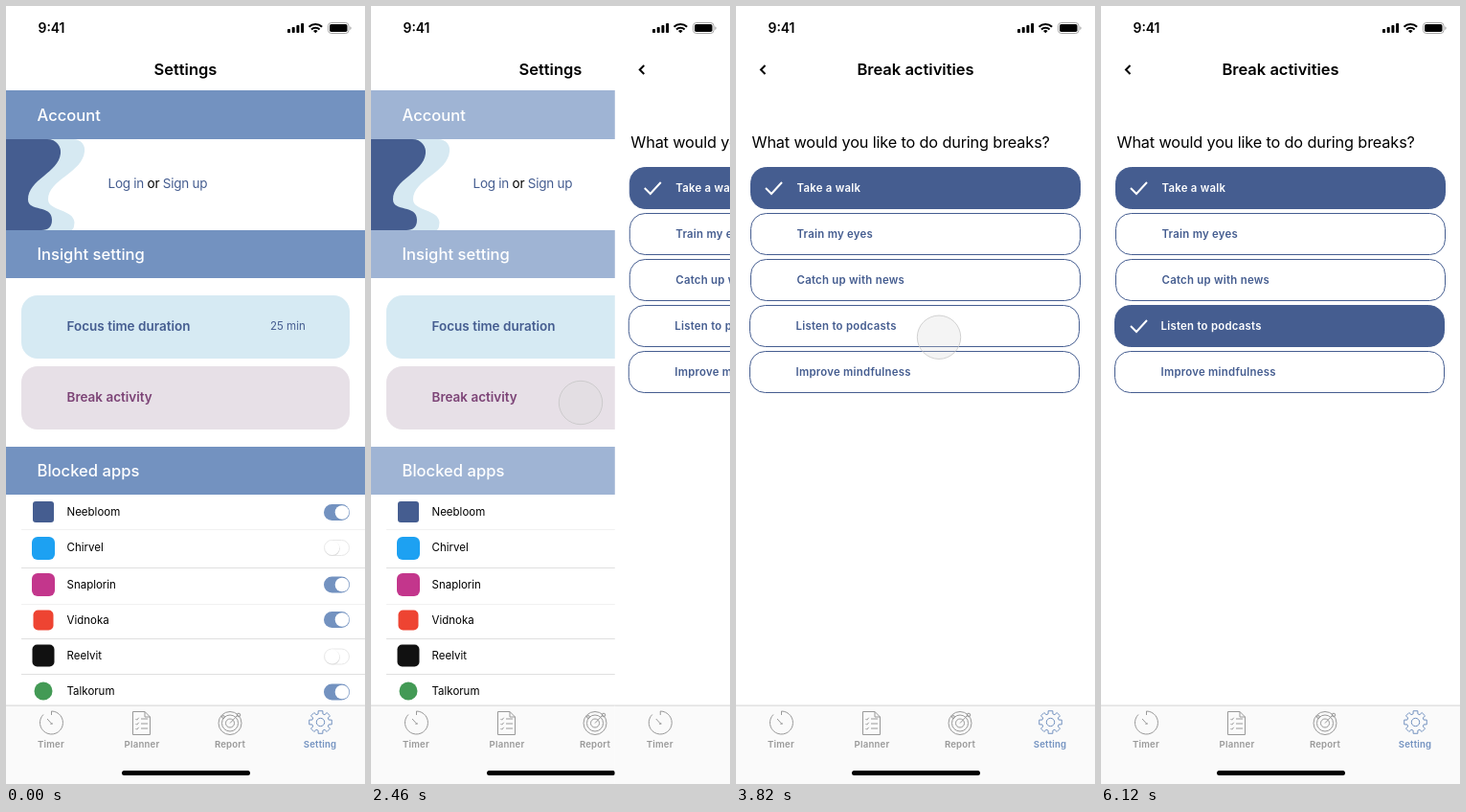
These frames come from a looping animation (375x812 px, 7.82 s). An HTML page:

```html
<!DOCTYPE html>
<html lang="en">
<head>
<meta charset="utf-8">
<title>Break settings</title>
<style>
  html, body { margin: 0; width: 100%; height: 100%; overflow: hidden; background: #fff; }
  svg { display: block; width: 100%; height: 100%; }
  text { font-family: Inter, "Liberation Sans", sans-serif; font-size: 11.5px; }
  .title { font-size: 16.5px; font-weight: 600; text-anchor: middle; }
  .head { font-size: 16.6px; font-weight: 500; fill: #fff; }
  .card { font-size: 13.5px; font-weight: 600; }
  .login { font-size: 13.5px; letter-spacing: -.25px; }
  .ask { font-size: 16.3px; letter-spacing: -.15px; }
  .option { font-size: 11.4px; font-weight: 600; letter-spacing: .25px; }
  .tab { font-size: 9.6px; font-weight: 600; letter-spacing: .2px; text-anchor: middle; }
  .line { fill: none; stroke: #999; stroke-width: 1; }
  .check { fill: none; stroke: #fff; stroke-width: 2; }
</style>
</head>
<body>
<svg id="stage" viewBox="0 0 375 812"></svg>
<script>
const LOOP = 7820, NAVY = '#455d90', BLUE = '#7392c0';

const rect = (x, y, w, h, r, fill, more = '') =>
  `<rect x="${x}" y="${y}" width="${w}" height="${h}" rx="${r}" fill="${fill}" ${more}/>`;
const circle = (x, y, r, more = '') => `<circle cx="${x}" cy="${y}" r="${r}" ${more}/>`;
const path = (d, more = '') => `<path d="${d}" ${more}/>`;
const text = (x, y, s, cls = '', fill = '#000', more = '') =>
  `<text x="${x}" y="${y}" class="${cls}" fill="${fill}" ${more}>${s}</text>`;

function gear(cx, cy) {
  const pts = [];
  for (let i = 0; i < 8; i++)
    for (const [off, r] of [[-.27, 9], [-.2, 12], [.2, 12], [.27, 9]]) {
      const a = i * Math.PI / 4 + off;
      pts.push((cx + r * Math.sin(a)).toFixed(2) + ' ' + (cy - r * Math.cos(a)).toFixed(2));
    }
  const style = `fill="none" stroke="${BLUE}" stroke-linejoin="round"`;
  return path('M' + pts.join('L') + 'Z', style) + circle(cx, cy, 4.2, style);
}

function tabBar() {
  const names = [['Timer', 47], ['Planner', 142], ['Report', 234], ['Setting', 328]];
  const ticks = [744, 749, 754].map(y => `M135.5 ${y}l1.2 1.2 2-2.4M141 ${y}h7`).join('');
  return rect(0, 730, 375, 82, 0, '#fafafa') + rect(0, 729.5, 375, 1.2, 0, '#dcdcdc') +
    path('M47.5 740v-4A12 12 0 1 1 39 739.5M48.5 750l-5.5-6M46.5 750l2-2', 'class="line"') +
    path('M132.5 736.5h12.5l5.5 5.5v18.5h-18zM145 736.5v5.5h5.5' + ticks, 'class="line"') +
    [12, 8.5, 4.5].map(r => circle(234, 748.5, r, 'class="line"')).join('') +
    path('M234 748.5l8-8.5', 'class="line"') +
    circle(243, 740, 1.8, 'class="line"') + circle(227, 742, 1.4, 'class="line"') +
    gear(328.5, 747.5) +
    names.map(([s, x], i) => text(x, 774, s, 'tab', i < 3 ? '#999' : BLUE)).join('') +
    rect(121, 798, 134, 5, 2.5, '#000');
}

function toggle(y, on) {
  return on
    ? rect(332, y - 8.5, 27, 17, 8.5, BLUE) + circle(351, y, 7.3, 'fill="#fff"')
    : rect(332.5, y - 8, 26, 16, 8, '#fff', 'stroke="#e8e8e8"') +
      circle(341, y + .8, 7.8, 'fill="#ddd"') + circle(340.7, y, 7.6, 'fill="#fff"');
}

const bars = [['Account', 88, 51], ['Insight setting', 234, 50], ['Blocked apps', 460, 50]];

// name, text centre, toggle centre, on, icon colour, icon size, corner radius
const apps = [
  ['Neebloom', 528, 528.5, 1, NAVY, 22, 3],
  ['Chirvel', 564.5, 565.5, 0, '#1da1f2', 24, 6],
  ['Snaplorin', 604, 604, 1, '#c3368c', 24, 6],
  ['Vidnoka', 641, 640.5, 1, '#ee4432', 21, 5],
  ['Reelvit', 678, 679, 0, '#111', 23, 5],
  ['Talkorum', 715, 716, 1, '#439a55', 19, 9.5],
];

const settings = rect(0, 0, 375, 812, 0, '#fff') +
  text(187.5, 72, 'Settings', 'title') +
  path('M0 139H70C79 139 83 146 82 152C80 174 44 181 44 202C44 214 71 212 71.5 226Q71.5 231 69 234H0Z', 'fill="#d6e9f2"') +
  path('M0 139H43C53 139 58 147 57 154C55 174 23 181 23 202C23 215 48 207 48 223Q48 234 37 234H0Z', `fill="${NAVY}"`) +
  text(106.5, 190, `Log in<tspan fill="#000"> or </tspan>Sign up`, 'login', NAVY) +
  rect(16, 302, 343, 66, 17, '#d6eaf3') + rect(16, 376, 343, 66, 17, '#e7e0e7') +
  text(63.5, 339, 'Focus time duration', 'card', NAVY) +
  text(276, 338, '25 min', '', NAVY) +
  text(63.5, 413, 'Break activity', 'card', '#7c4376') +
  '<g id="bars">' + bars.map(([s, y, h]) =>
    rect(0, y, 375, h, 0, BLUE) + text(32.5, y + 32 - (h < 51), s, 'head')).join('') + '</g>' +
  [546, 586, 624, 660, 697].map((y, i) =>
    rect(16, y, 359, 1, 0, i % 2 || i == 4 ? '#e0e0e0' : '#f1f1f1')).join('') +
  apps.map(([s, y, ty, on, fill, size, r], i) =>
    rect(39 - size / 2, y + (i == 1 ? 1.5 : 0) - size / 2, size, size, r, fill) +
    text(63.5, y + 4, s) + toggle(ty, on)).join('') +
  tabBar();

const options = ['Take a walk', 'Train my eyes', 'Catch up with news', 'Listen to podcasts', 'Improve mindfulness'];

const activities = rect(0, 0, 375, 812, 0, '#fff') +
  path('M30.5 62L26 66.5L30.5 71', 'fill="none" stroke="#000" stroke-width="2"') +
  text(187.5, 72, 'Break activities', 'title') +
  text(16.5, 148, 'What would you like to do during breaks?', 'ask') +
  options.map((s, i) => {
    const x = i < 3 ? 15.5 : 14.5, y = 168.5 + 48 * i;
    return rect(x, y, 344, 43, 16, i ? '#fff' : NAVY, `stroke="${NAVY}" id="row${i}"`) +
      text(x + 48, y + 25.6, s, 'option', i ? NAVY : '#fff', `id="label${i}"`) +
      (i % 3 ? '' : path(`M31 ${y + 21.5}l6 6l11 -12`, `class="check" id="check${i}"`));
  }).join('') +
  tabBar();

const status = text(33.5, 28, '9:41', '', '#000', 'style="font-size:13.9px;font-weight:600"') +
  [4, 6, 8, 10].map((h, i) => rect(294 + i * 4.7, 28 - h, 3, h, .8, '#000')).join('') +
  path('M316.5 21.8a9.8 9.8 0 0 1 13.6 0M319 24.5a6.2 6.2 0 0 1 8.6 0', 'fill="none" stroke="#000" stroke-width="2.1"') +
  path('M323.3 28.3l-2.3 -2.3a3.4 3.4 0 0 1 4.6 0z') +
  rect(336.5, 17.5, 21.5, 11, 3.2, 'none', 'stroke="#a6a6a6"') +
  rect(338, 19, 18.5, 8, 1.8, '#000') + path('M359.3 21.2a2 2 0 0 1 0 3.8z', 'fill="#a6a6a6"');

const $ = id => document.getElementById(id);
$('stage').innerHTML = `<g>${settings}</g><g id="next">${activities}</g>${status}` +
  circle(0, 0, 23, 'id="touch" fill="#d8d8d8" fill-opacity=".28" stroke="#c4c4c4" stroke-opacity=".85" stroke-width=".9"');

const clamp = v => Math.min(1, Math.max(0, v));

// cubic-bezier(.25, .1, .25, 1)
function ease(p) {
  if (p <= 0 || p >= 1) return clamp(p);
  let lo = 0, hi = 1, s;
  for (let i = 0; i < 22; i++) {
    s = (lo + hi) / 2;
    if (.75 * s * (1 - s) + s ** 3 < p) lo = s; else hi = s;
  }
  return .3 * s * (1 - s) ** 2 + 3 * s * s * (1 - s) + s ** 3;
}

// time, x, y, radius of the touch point
const touch = [
  [1150, 398, 383, 22.7], [1760, 221, 418, 22.7], [1920, 219, 414, 22.7],
  [3280, 219, 414, 22.7], [4060, 210, 326, 22.7], [4080, 210, 326, 22.7],
  [4300, 210, 320, 22.7], [4470, 210, 320, 22.7], [4600, 210, 315, 22.7],
  [4860, 209, 328, 22.7], [4940, 209, 326, 22.7], [5130, 209, 326, 22.7],
  [5220, 209, 326, 21.8], [5420, 209, 326, 22.7], [5740, 209, 326, 22.7],
  [6130, 400, 244, 22.7],
];

function touchAt(t) {
  const i = touch.findIndex(k => k[0] > t);
  if (i < 1) return [-99, -99, 0];
  const a = touch[i - 1], b = touch[i], u = (t - a[0]) / (b[0] - a[0]), s = u * u * (3 - 2 * u);
  return [1, 2, 3].map(k => a[k] + (b[k] - a[k]) * s);
}

function draw() {
  const t = performance.now() % LOOP;
  const slide = ease((t - 2385) / 360), pick = ease((t - 5135) / 300), picked = pick > 0;

  $('next').setAttribute('transform', `translate(${375 * (1 - slide)} 0)`);
  $('bars').setAttribute('opacity', 1 - slide);

  // the fill grows out of transparent black
  $('row3').setAttribute('fill', `rgba(${[69, 93, 144].map(c => Math.round(c * pick))},${pick})`);
  $('label3').setAttribute('fill', picked ? '#fff' : NAVY);
  $('check3').setAttribute('opacity', +picked);
  $('check0').setAttribute('opacity', picked ? pick : 1);

  const [x, y, r] = touchAt(t), dot = $('touch');
  dot.setAttribute('cx', x);
  dot.setAttribute('cy', y);
  dot.setAttribute('r', r);
  requestAnimationFrame(draw);
}
draw();
</script>
</body>
</html>
```
